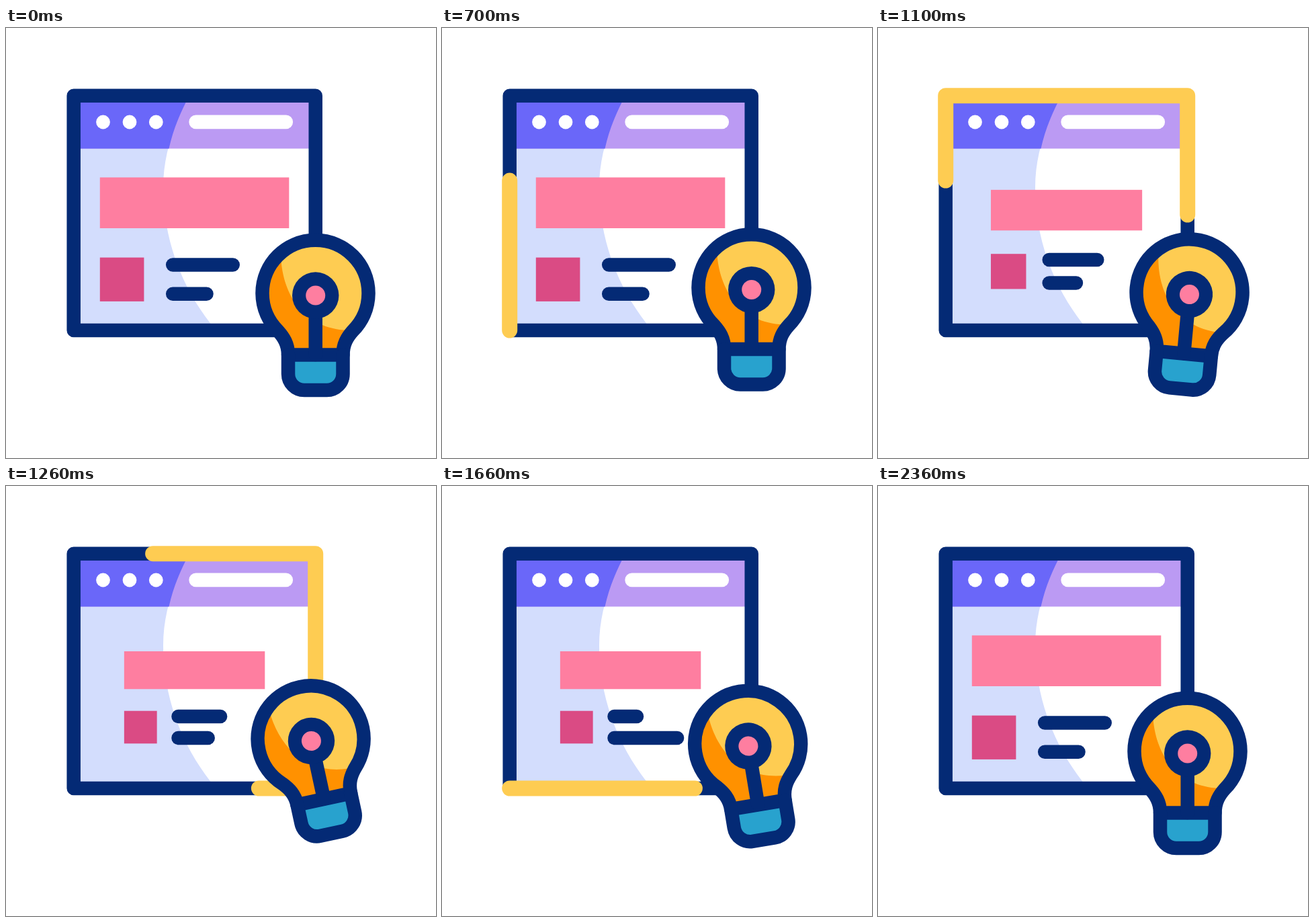
These frames come from a looping animation (640 by 640 pixels, 2.4 s). An HTML page:

```html
<!DOCTYPE html>
<html lang="en">
<head>
<meta charset="utf-8">
<title>Browser idea</title>
<style>
  html, body { margin: 0; width: 100%; height: 100%; overflow: hidden; background: #fff; }
  svg { display: block; width: 100vw; height: 100vh; }
  .line { fill: none; stroke: #042a75; stroke-width: 20.5; stroke-linecap: round; stroke-linejoin: round; }
  .trail { fill: none; stroke: #fecc52; stroke-width: 23; stroke-linecap: round; stroke-linejoin: round; }
</style>
</head>
<body>
<svg viewBox="0 0 640 640">
  <defs>
    <path id="glass" d="M420 486.5C420 470 413 460 405 451A79 79 0 1 1 516 451C508 460 501.5 470 501.5 486.5Z"/>
    <clipPath id="glassClip"><use href="#glass"/></clipPath>
  </defs>

  <!-- window -->
  <path fill="#fff" d="M100 100H461V450H100Z"/>
  <path fill="#d3ddfd" d="M100 110H268C247 152 234 193 234 237C234 312 260 383 304.5 440V450H100Z"/>
  <path fill="#bb9af3" d="M100 100H461V179.5H100Z"/>
  <path fill="#6a67f9" d="M100 100H273L268 110C255 136 247.500 157 242.500 179.5H100Z"/>
  <g fill="#fff">
    <circle cx="144.500" cy="140" r="10.400"/>
    <circle cx="184" cy="140" r="10.400"/>
    <circle cx="223.300" cy="140" r="10.400"/>
    <rect x="272.300" y="129.500" width="154.800" height="20.800" rx="10.400"/>
  </g>
  <rect class="line" x="100.700" y="100.700" width="360" height="349.300"/>

  <!-- page content -->
  <rect id="banner" fill="#fe7ea0"/>
  <rect id="thumb" fill="#da4b84"/>
  <path id="text1" class="line"/>
  <path id="text2" class="line"/>

  <path id="trail" class="trail" d="M100.700 450V100.700H460.700V450H100.700"/>

  <!-- bulb -->
  <g id="bulb">
    <path fill="#28a2ce" d="M420 486.500V515a24 24 0 0 0 24 24h33.500a24 24 0 0 0 24-24V486.500Z"/>
    <use href="#glass" fill="#fecc52"/>
    <path clip-path="url(#glassClip)" fill="#ff9100" d="M408 320L409 340C412 400 445 447 508 450L520 500H360V320Z"/>
    <use href="#glass" class="line"/>
    <path class="line" d="M420 486.500V515a24 24 0 0 0 24 24h33.500a24 24 0 0 0 24-24V486.500M460.700 400V486"/>
    <circle cx="460.700" cy="398" r="34.700" fill="#042a75"/>
    <circle cx="460.700" cy="398" r="14.500" fill="#fe7ea0"/>
  </g>
</svg>
<script>
  const LOOP = 2400;
  const CX = 280.6, CY = 314.7;
  const $ = id => document.getElementById(id);
  const [banner, thumb, text1, text2, trail, bulb] =
    ['banner', 'thumb', 'text1', 'text2', 'trail', 'bulb'].map($);

  // Each track is a list of [time, value], eased in and out between steps.
  const tracks = {
    head: [[400, 0], [1600, 1]],
    tail: [[800, 0], [2000, 1]],
    zoom: [[752, 1], [1252, 0.744], [1858, 0.744], [2358, 1]],
    swap: [[1195, 0], [1500, 1], [1660, 1], [1930, 0]],
    lift: [[200, 0], [410, -21], [610, 0], [820, -21], [1060, 0], [1305, -21],
           [1540, 0], [1770, -21], [2000, 0]],
    tilt: [[800, 0], [1020, 12.4], [1250, -12.4], [1485, 12.4], [1710, -12.4],
           [2000, 0], [2180, 54], [2360, 0]]
  };

  function valueAt(name, t) {
    const keys = tracks[name];
    if (t <= keys[0][0]) return keys[0][1];
    for (let i = 1; i < keys.length; i++) {
      const [t0, a] = keys[i - 1], [t1, b] = keys[i];
      if (t < t1) {
        const u = (t - t0) / (t1 - t0);
        return a + (b - a) * u * u * (3 - 2 * u);
      }
    }
    return keys[keys.length - 1][1];
  }

  function placeRect(el, x, y, w, h, k) {
    const box = { x: CX + (x - CX) * k, y: CY + (y - CY) * k, width: w * k, height: h * k };
    for (const name in box) el.setAttribute(name, box[name]);
  }

  // Text bars shrink in length but keep their thickness.
  function placeBar(el, y, length, k) {
    const x = CX - 32.4 * k;
    el.setAttribute('d', `M${x} ${CY + (y - CY) * k}h${length * k}`);
  }

  const side = trail.getTotalLength();

  function draw(t) {
    const k = valueAt('zoom', t), swap = valueAt('swap', t);
    placeRect(banner, 139.8, 222.4, 281.5, 75.6, k);
    placeRect(thumb, 139.8, 341.6, 65.6, 65.3, k);
    placeBar(text1, 352.6, 89.5 - 44.5 * swap, k);
    placeBar(text2, 395.7, 50.3 + 75.5 * swap, k);

    const head = valueAt('head', t) * side, tail = valueAt('tail', t) * side;
    trail.style.visibility = head > tail ? 'visible' : 'hidden';
    trail.setAttribute('stroke-dasharray', `0 ${tail} ${head - tail} ${side * 2}`);

    bulb.setAttribute('transform',
      `translate(0 ${valueAt('lift', t)}) rotate(${valueAt('tilt', t)} 460.7 427.5)`);
  }

  // A leading zero-length dash would leave a cap at the path start, so offset the dash instead.
  function drawTrail(t) {
    const head = valueAt('head', t) * side, tail = valueAt('tail', t) * side;
    trail.setAttribute('stroke-dasharray', `${Math.max(head - tail, 0.01)} ${side * 2}`);
    trail.setAttribute('stroke-dashoffset', -tail);
  }

  const start = performance.now();
  function tick() {
    const t = (performance.now() - start) % LOOP;
    draw(t);
    drawTrail(t);
    requestAnimationFrame(tick);
  }
  tick();
</script>
</body>
</html>
```
